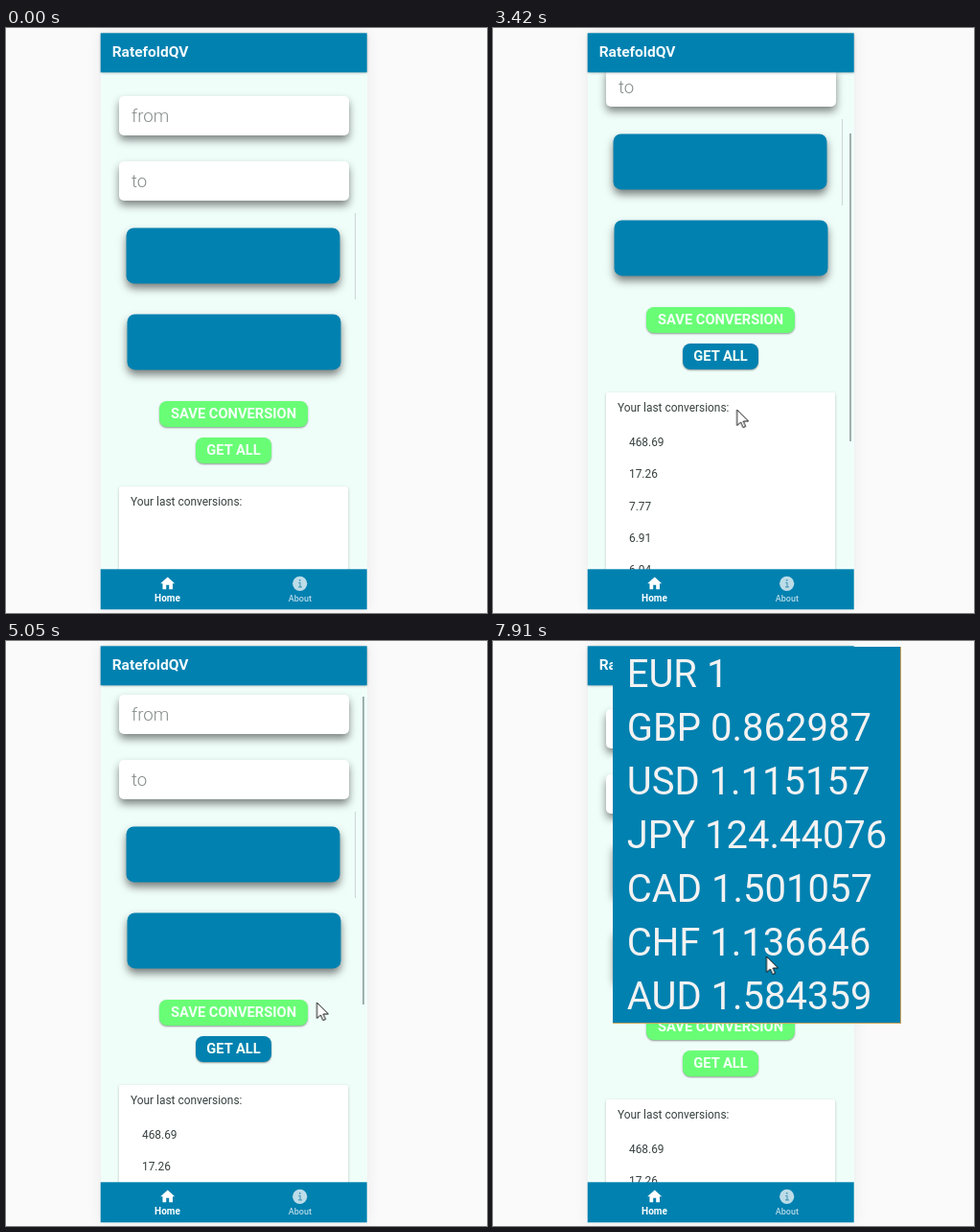
An HTML page that plays this animation: 502x610 px, repeating every 7.99 s.

```html
<!DOCTYPE html>
<html lang="en">
<head>
<meta charset="utf-8">
<title>Currency converter</title>
<style>
@property --s { syntax: "<number>"; inherits: true; initial-value: 0; }
@property --k { syntax: "<number>"; inherits: true; initial-value: 0.863; }

:root { --blue: #0081b0; --green: #69fd76; --loop: 7990ms; }
html, body { margin: 0; width: 100%; height: 100%; overflow: hidden; background: #fafafa; }
body { position: relative; font-family: Roboto, "Open Sans", sans-serif; }
body * { position: absolute; box-sizing: border-box; white-space: nowrap; }

.phone { left: 99px; top: 5px; width: 278px; height: 601px; background: #f0fefa; box-shadow: 0 0 14px rgba(0,0,0,.07); }
.view { inset: 0; clip-path: inset(46px calc(100% - 377px) calc(100% - 565px) 99px); animation: scroll var(--loop) step-end infinite; }
.page { left: 0; top: 0; transform: translateY(calc(var(--s) * -1px)); }
.track { left: 372px; top: calc(48.7px + var(--s) * var(--k) * 1px); width: 2px; height: calc(517px * var(--k)); background: #9db0ac; animation: track var(--loop) step-end infinite; }

.head { left: 99px; top: 5px; width: 278px; height: 41px; background: var(--blue); box-shadow: 0 1px 3px rgba(0,0,0,.35); translate: -.3px .3px; }
.head b { left: 12px; top: 0; font-size: 15.5px; font-weight: 700; line-height: 41px; color: #f4fbfd; }
.foot { left: 99px; top: 564px; width: 278px; height: 42px; background: var(--blue); translate: -.3px .3px; }
.foot span { width: 60px; text-align: center; line-height: 12px; top: 25px; color: #fff; }
.foot svg { overflow: visible; }

.field { left: 118px; width: 240px; height: 41px; border-radius: 5px; background: #fff; box-shadow: 0 5px 8px rgba(0,0,0,.48); padding-left: 13px; font-size: 18.6px; font-weight: 300; line-height: 42px; color: #858c8b; }
.box { width: 223px; height: 58px; border-radius: 8px; background: var(--blue); box-shadow: 0 5px 8px rgba(0,0,0,.5); font-size: 40px; line-height: 60px; color: #f2f2f2; translate: .5px .4px; }
.pick { left: 13.5px; top: 0; animation: pick var(--loop) step-end infinite; }
.rule { left: 364px; top: 193px; width: 1px; height: 90px; background: #c9d6d2; }
.btn { height: 27px; border-radius: 8px; background: var(--green); box-shadow: 0 1px 2px rgba(0,0,0,.4); text-align: center; font-size: 14.7px; font-weight: 700; line-height: 27px; color: #f3fff6; }
.all { animation: all var(--loop) linear infinite; }

.card { left: 118px; top: 478px; width: 239px; height: 143px; background: #fff; border-radius: 2px; box-shadow: 0 1px 3px rgba(0,0,0,.25); font-size: 11.9px; color: #36413f; animation: card var(--loop) step-end infinite; }
.card > span { left: 12px; top: 8px; line-height: 16px; }
.rows { left: 24px; top: 36px; line-height: 33.35px; }
.rows div { position: static; }
.zeros { animation: zeros var(--loop) step-end infinite; }
.sums { animation: sums var(--loop) step-end infinite; }

.menu { width: 301px; background: var(--blue); font-size: 40px; line-height: 58px; color: #f2f2f2; visibility: hidden; border-right: 1px solid #c9a25c; }
.menu div { position: static; padding-left: 14.7px; height: 56px; }
.low { left: 124px; top: 265px; animation: low var(--loop) step-end infinite; }
.low div:first-child { background: #1596c4; }
.high { left: 125px; top: 6px; border-bottom: 1px solid #c9a25c; animation: high var(--loop) step-end infinite; }

.mouse { left: 0; top: 0; width: 13px; height: 20px; overflow: visible; animation: mouse var(--loop) ease-in-out infinite; }
.tap { left: -12px; top: -12px; width: 24px; height: 24px; border-radius: 50%; background: rgba(240,240,30,.52); visibility: hidden; animation: tap var(--loop) step-end infinite; }

@keyframes scroll {
  0% { --s: 0; --k: .863; }
  11.58% { --s: 12; --k: .863; }
  12.56% { --s: 40; --k: .863; }
  13.54% { --s: 66; --k: .863; }
  14.51% { --s: 76; --k: .863; }
  32.04% { --s: 76; --k: .621; }
  42.74% { --s: 98; --k: .621; }
  43.70% { --s: 140; --k: .621; }
  44.66% { --s: 176; --k: .621; }
  45.63% { --s: 222; --k: .621; }
  46.68% { --s: 274; --k: .621; }
  47.55% { --s: 309; --k: .621; }
  48.56% { --s: 311; --k: .621; }
  58.32% { --s: 297; --k: .621; }
  59.29% { --s: 255; --k: .621; }
  60.27% { --s: 211; --k: .621; }
  61.25% { --s: 150; --k: .621; }
  62.22% { --s: 75; --k: .621; }
  63.20% { --s: 15; --k: .621; }
  64.20% { --s: 10; --k: .621; }
  65.14% { --s: 4; --k: .621; }
  66.08%, 100% { --s: 0; --k: .621; }
}
@keyframes track {
  0%, 21.40%, 71.71%, 100% { visibility: hidden; }
  11.58%, 42.74% { visibility: visible; }
}
@keyframes all {
  0%, 32.04% { background: var(--green); }
  35.79% { background: var(--blue); animation-timing-function: step-end; }
  78.84%, 100% { background: var(--green); }
}
@keyframes card {
  0% { height: 143px; }
  32.04%, 100% { height: 378px; }
}
@keyframes zeros {
  0%, 32.97%, 100% { visibility: hidden; }
  32.04% { visibility: visible; }
}
@keyframes sums {
  0% { visibility: hidden; }
  32.97%, 100% { visibility: visible; }
}
@keyframes pick {
  0% { visibility: hidden; }
  90.48%, 100% { visibility: visible; }
}
@keyframes low {
  0%, 90.48%, 100% { visibility: hidden; }
  78.84% { visibility: visible; }
}
@keyframes high {
  0% { visibility: hidden; }
  94.31%, 100% { visibility: visible; }
}
@keyframes mouse {
  0% { translate: 378px 582px; visibility: hidden; animation-timing-function: step-end; }
  4.75% { translate: 378px 582px; visibility: visible; }
  10.63%, 19.27% { translate: 304.5px 345px; visibility: visible; }
  27.28%, 37.92% { translate: 239.5px 365px; visibility: visible; }
  43.80%, 53.44% { translate: 255.5px 400px; visibility: visible; }
  61.25%, 67.96% { translate: 324.5px 377px; visibility: visible; }
  74.84%, 78.84% { translate: 272px 258px; visibility: visible; }
  86.60%, 94.31% { translate: 285.5px 312px; visibility: visible; }
  98.99%, 100% { translate: 285.5px 329px; visibility: visible; }
}
@keyframes tap {
  0%, 32.04%, 78.84%, 90.48%, 94.31%, 100% { translate: 239px 365px; visibility: hidden; }
  30.16% { translate: 239px 365px; visibility: visible; }
  74.84% { translate: 272px 258px; visibility: visible; }
  89.48%, 93.36% { translate: 285px 312px; visibility: visible; }
}
</style>
</head>
<body>
<div class="phone"></div>
<div class="view">
  <div class="page">
    <div class="field" style="top:71px">from</div>
    <div class="field" style="top:139px">to</div>
    <div class="rule"></div>
    <div class="box" style="left:125px;top:208px"><span class="pick">EUR 1</span></div>
    <div class="box" style="left:126px;top:298px"></div>
    <div class="btn" style="left:160px;top:388.5px;width:155px">SAVE CONVERSION</div>
    <div class="btn all" style="left:198px;top:427px;width:79px">GET ALL</div>
    <div class="card">
      <span>Your last conversions:</span>
      <div class="rows zeros"></div>
      <div class="rows sums"></div>
    </div>
  </div>
  <div class="track"></div>
</div>
<div class="head"><b>RatefoldQV</b></div>
<div class="foot">
  <svg style="left:60.6px;top:5.8px" width="18" height="18" viewBox="0 0 24 24"><path fill="#fff" d="M10 20v-6h4v6h5v-8h3L12 3 2 12h3v8z"/></svg>
  <span style="left:39.8px;font-size:10px;font-weight:700">Home</span>
  <svg style="left:200.3px;top:6.5px" width="16" height="16"><circle cx="8" cy="8" r="7.6" fill="#bcdce8"/><path d="M6.6 7.2H8.3V11.4M6.4 11.6H10.2" fill="none" stroke="#4a98b6" stroke-width="1.1"/><circle cx="8" cy="4.6" r=".9" fill="#4a98b6"/></svg>
  <span style="left:178.2px;font-size:9px;font-weight:500;color:#b5d9e7">About</span>
</div>
<div class="menu low"></div>
<div class="menu high"></div>
<svg class="mouse"><path d="M0 0V16.5L3.9 13L6.4 18.6L9 17.5L6.6 12H12Z" fill="#fff" stroke="#111" stroke-width="1"/></svg>
<div class="tap"></div>
<script>
const fill = (sel, items) => document.querySelectorAll(sel).forEach(box => {
  for (const text of items) {
    const row = document.createElement('div');
    row.textContent = text;
    box.append(row);
  }
});
const sums = ['468.69', '17.26', '7.77', '6.91', '6.04', '5.18', '3.45', '2.59', '1.73', '0.86'];
fill('.sums', sums);
fill('.zeros', sums.map((v, i) => i ? '0' : v));
fill('.menu', ['EUR 1', 'GBP 0.862987', 'USD 1.115157', 'JPY 124.44076',
  'CAD 1.501057', 'CHF 1.136646', 'AUD 1.584359']);
</script>
</body>
</html>
```
